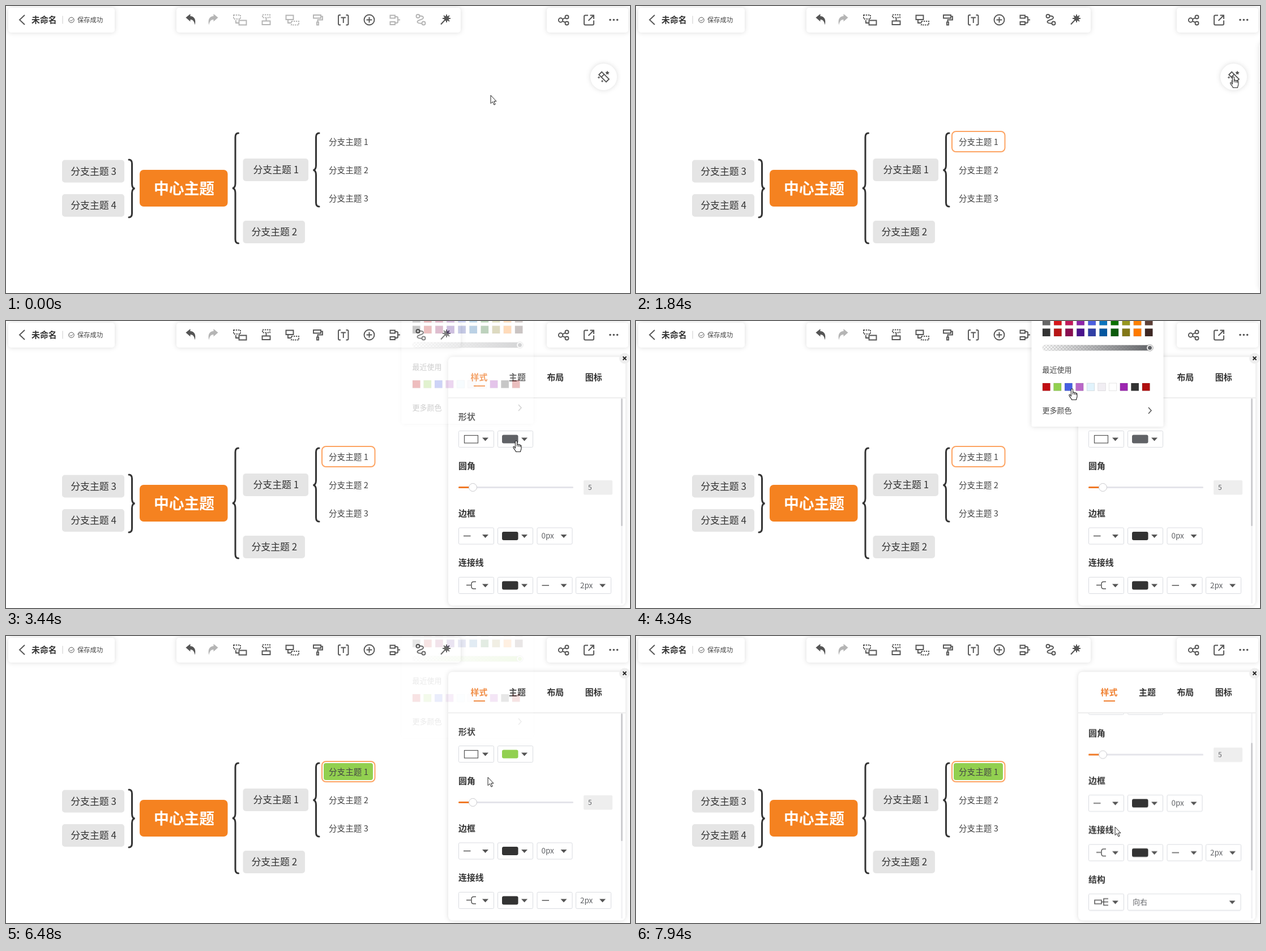
An HTML page that plays this animation: 1102x508 px, repeating every 8 s.

```html
<!DOCTYPE html>
<html lang="zh-CN">
<head>
<meta charset="utf-8">
<title>思维导图</title>
<style>
html, body { margin: 0; width: 100%; height: 100%; overflow: hidden; background: #fff; }
svg { display: block; width: 1102px; height: 508px; font-family: "Noto Sans CJK SC", "Noto Sans CJK", sans-serif; }
.card { fill: #fff; filter: drop-shadow(0 0 4px rgba(0, 0, 0, .14)); }
.icon { fill: none; stroke: currentColor; stroke-width: 1.9; color: #555; }
.thin { stroke-width: 1; }
.solid { fill: currentColor; stroke: none; }
.dash { stroke-dasharray: 2.4 1.6; }
.off { color: #b5b5b5; }
.brace { fill: none; stroke: #333; stroke-width: 3; stroke-linecap: round; }
.node { fill: #e5e5e5; }
.main { font-size: 16.9px; font-weight: 350; fill: #333; }
.sub { font-size: 14.6px; font-weight: 350; fill: #444; }
.head { font-size: 14.9px; font-weight: 700; fill: #333; }
.box { fill: #fff; stroke: #d9dbe0; }
.value { font-size: 13.5px; fill: #606266; }
.tri { fill: #555; }

.needs, .paint, .pick, .green, #arrow, #hand, #halo { animation: 8s step-end infinite; }
.needs { animation-name: enable; }
.paint { animation-name: paint; }
.pick { animation-name: pick; }
.green { animation-name: green; }
#arrow { animation-name: arrow; }
#hand { animation-name: hand; }
#halo { animation-name: halo; }
#cursor { animation: move 8s linear infinite; }
#panel { animation: slide 8s linear infinite; }
#popup { animation: popup 8s linear infinite; }
#content { animation: scroll 8s linear infinite; }
#thumb { animation: thumb 8s linear infinite; }

@keyframes enable { 0% { color: #b5b5b5 } 12%, 100% { color: #555 } }
@keyframes paint { 0% { color: #606266 } 60%, 100% { color: #92d050 } }
@keyframes pick { 0% { opacity: 0 } 12%, 100% { opacity: 1 } }
@keyframes green { 0% { opacity: 0 } 60%, 100% { opacity: 1 } }
@keyframes hand {
  0%, 23.1%, 47%, 65.4%, 91%, 100% { opacity: 0 }
  18.5%, 33.1%, 50.6%, 86% { opacity: 1 }
}
@keyframes arrow {
  0%, 23.1%, 47%, 65.4%, 91%, 100% { opacity: 1 }
  18.5%, 33.1%, 50.6%, 86% { opacity: 0 }
}
@keyframes halo {
  0%, 14.4%, 22.2%, 41.7%, 61.1%, 80.2%, 100% { opacity: 0 }
  12%, 20.5%, 40%, 59.4%, 78.6% { opacity: .7 }
}
@keyframes move {
  0%, 7.4% { transform: translate(856px, 158px) }
  11.8%, 14.4% { transform: translate(610px, 244px) }
  17% { transform: translate(933px, 158px) }
  18.9% { transform: translate(1050px, 127px) }
  20%, 23% { transform: translate(1055px, 125px) }
  27.375% { transform: translate(988px, 148px) }
  33.75% { transform: translate(906px, 207px) }
  37.9%, 45.4% { transform: translate(901px, 212px) }
  48.25%, 48.5% { transform: translate(861px, 167px) }
  51.75%, 54.1% { transform: translate(778px, 120px) }
  54.25%, 56.5% { transform: translate(770px, 120px) }
  58.5%, 63% { transform: translate(746px, 117px) }
  66.25% { transform: translate(834px, 139px) }
  70.625% { transform: translate(852px, 136px) }
  76.75%, 80.5% { transform: translate(846px, 241px) }
  87.125% { transform: translate(911px, 358px) }
  88.875% { transform: translate(912px, 371px) }
  90.5% { transform: translate(917px, 372px) }
  92.4%, 94.2% { transform: translate(897px, 368px) }
  99.25%, 100% { transform: translate(846px, 338px) }
}
@keyframes slide {
  0%, 22.8% { transform: translate(340px) }
  25% { transform: translate(130px) }
  27.375% { transform: translate(23px) }
  29%, 100% { transform: none }
}
@keyframes popup {
  0%, 42.1% { opacity: 0; transform: translateY(-8px) }
  43% { opacity: .27; transform: translateY(-5px) }
  45.5%, 78.8% { opacity: 1; transform: none }
  81.3%, 100% { opacity: 0; transform: translateY(-8px) }
}
@keyframes scroll { 0%, 94.2% { transform: none } 98.4%, 100% { transform: translateY(-84.5px) } }
@keyframes thumb { 0%, 94.2% { transform: none } 98.4%, 100% { transform: translateY(52px) } }
</style>
</head>
<body>
<svg viewBox="0 0 1102 508">
  <defs>
    <clipPath id="body"><rect x="781" y="137" width="313" height="365"/></clipPath>
    <pattern id="checks" width="6" height="6" patternUnits="userSpaceOnUse">
      <path d="M0 0h3v6h3v-3h-6z" fill="#ddd"/>
    </pattern>
    <linearGradient id="alpha">
      <stop class="paint" stop-color="currentColor" stop-opacity="0"/>
      <stop class="paint" offset="1" stop-color="currentColor"/>
    </linearGradient>
  </defs>

  <!-- mind map -->
  <g class="brace">
    <path d="M410.500 225q-5.500 0-5.500 7V314q0 8-5 8.500q5 .5 5 8.500V413q0 7 5.500 7"/>
    <path d="M553 225q-5.500 0-5.500 7V282q0 8-5 8.500q5 .5 5 8.500V348q0 7 5.500 7"/>
    <path d="M217 272q5.500 0 5.500 7V314.500q0 8 5 8.500q-5 .5-5 8.500V367q0 7-5.500 7"/>
  </g>
  <rect x="236" y="290" width="155.500" height="65" rx="7" fill="#f58220"/>
  <text x="314.500" y="332.800" font-size="26.800" font-weight="700" fill="#fff" text-anchor="middle">中心主题</text>
  <g id="map"></g>

  <!-- toolbars -->
  <rect class="card" x="4" y="3" width="188" height="44" rx="5"/>
  <rect class="card" x="301" y="3" width="502" height="44" rx="5"/>
  <rect class="card" x="955" y="3" width="144" height="44" rx="5"/>
  <path class="icon" d="M33 16l-9 8.500l9 8.500"/>
  <text class="head" x="45" y="29.500">未命名</text>
  <path d="M100 17.500v14" stroke="#ccc"/>
  <g class="icon thin"><circle cx="115.500" cy="24.800" r="4.700"/><path d="M113 24.800l2 2l3.300-3.500"/></g>
  <text x="126" y="28.800" font-size="11.300" font-weight="350" fill="#444">保存成功</text>

  <g class="icon">
    <path id="undo" class="solid" d="M317.500 20.500L325.500 14V18C333 18 336 25 333.500 33.500C332.500 27 330 24 325.500 24V27.500Z"/>
    <g class="icon off"><use href="#undo" transform="translate(692) scale(-1 1)"/></g>
    <g class="needs">
      <path class="dash" d="M402 16h12v7h-12z"/><path d="M406 25v5h5M411.500 25.500h13v8h-13z"/>
      <path class="dash" d="M453 15.500h13v5h-13z"/><path d="M459.500 21v5M452.500 26.500h14v6.500h-14z"/>
      <path d="M494.500 16.500h13v7.500h-13zM498 24v6h5"/><path class="dash" d="M504 27h13v6.500h-13z"/>
      <path d="M543 16h13v5.500h-13zM556 18.500h3v6h-8.500v3.500M549 28.500h3v5h-3z"/>
      <path d="M678.500 16.500h8.500v5h-8.500zM678.500 28h8.500v5h-8.500zM687 19h3q2 0 2 2v7q0 2-2 2h-3M692 24.500h4"/>
      <circle cx="727.500" cy="18" r="3"/><circle cx="737.500" cy="30.500" r="3"/>
      <path d="M730.500 17.500c8 0 8 4.500 3 6.300l-3.500 1.200c-6 2-4.500 6 4.500 5.700"/>
    </g>
    <path d="M591 16h-2q-2 0-2 2v13.500q0 2 2 2h2M600.500 16h2q2 0 2 2v13.500q0 2-2 2h-2M591.500 20.500h8.500M595.800 20.500v9.500"/>
    <circle cx="641.500" cy="24.500" r="9"/><path d="M636.500 24.500h10M641.500 19.500v10"/>
    <circle class="solid" cx="778" cy="22" r="4.500"/>
    <path d="M778 15v14M771 22h14M773 17l10 10M783 17l-10 10M774 26l-6 6.500"/>

    <circle cx="979.500" cy="25" r="3.700"/><circle cx="990.500" cy="19.500" r="3"/><circle cx="990.500" cy="30.500" r="3"/>
    <path d="M983 23.300l4.800-2.400M983 26.800l4.800 2.400"/>
    <path d="M1028 16.500h-5q-2 0-2 2v13q0 2 2 2h13q2 0 2-2v-6M1028.500 26l9-9M1031.500 16.500h6.500v6.500"/>
    <g class="solid"><circle cx="1067" cy="24.500" r="1.800"/><circle cx="1073.300" cy="24.500" r="1.800"/><circle cx="1079.600" cy="24.500" r="1.800"/></g>
  </g>

  <circle class="card" cx="1055.500" cy="125.500" r="23.500"/>
  <g class="icon">
    <path d="M-9-3.500h18v7h-18zM-3-3.500v7" transform="translate(1056 125.500) rotate(45)"/>
    <path class="solid" d="M1062 114.500l1.200 2.300l2.500.4l-1.800 1.800l.4 2.500l-2.300-1.200l-2.300 1.200l.4-2.500l-1.800-1.800l2.500-.4zM1047 124l.8 1.700l1.700.8l-1.700.8l-.8 1.700l-.8-1.700l-1.700-.8l1.700-.8zM1053 130.500l.8 1.700l1.700.8l-1.700.8l-.8 1.700l-.8-1.700l-1.700-.8l1.700-.8z"/>
  </g>

  <!-- style panel -->
  <g id="panel">
    <rect class="card" x="781" y="63.500" width="313" height="440" rx="8"/>
    <g clip-path="url(#body)">
      <g id="content"></g>
      <path d="M1087.500 137V500" stroke="#f3f3f5" stroke-width="3"/>
      <rect id="thumb" x="1086" y="137" width="3" height="226" rx="1.500" fill="#cdcdd0"/>
    </g>
    <path d="M781 136h313" stroke="#ddd" stroke-width="1.200"/>
    <g id="tabs"></g>
    <path d="M826 115h20" stroke="#f08030" stroke-width="2"/>
    <circle cx="1092.500" cy="66" r="9.500" fill="#eee"/>
    <path d="M1089.500 63l6 6M1095.500 63l-6 6" stroke="#222" stroke-width="1.800"/>
  </g>

  <!-- colour popup -->
  <g id="popup">
    <rect class="card" x="698.500" y="-20" width="233" height="207" rx="3"/>
    <g id="swatches"></g>
    <rect x="718" y="42.500" width="195" height="10" rx="5" fill="url(#checks)"/>
    <rect x="718" y="42.500" width="195" height="10" rx="5" fill="url(#alpha)" stroke="#ddd" stroke-width=".7"/>
    <circle class="paint" cx="907.500" cy="47.500" r="4.500" fill="currentColor" stroke="#fff" stroke-width="2"/>
    <circle cx="907.500" cy="47.500" r="5.600" fill="none" stroke="#888" stroke-width=".8"/>
    <g font-size="13" font-weight="350" fill="#444"><text x="717.500" y="90.500">最近使用</text><text x="717.500" y="163">更多颜色</text></g>
    <path d="M905 153l5 5.500l-5 5.500" fill="none" stroke="#555" stroke-width="1.500"/>
  </g>

  <g id="cursor">
    <circle id="halo" cy="-2" r="10" fill="#f3ec38"/>
    <path id="arrow" d="M0 0V14.500L3.400 11.500L5.900 17L8.100 16L5.700 10.700H10Z" fill="#fff" stroke="#222"/>
    <path id="hand" d="M-1.600 1.600a1.600 1.600 0 0 1 3.200 0V7a1.500 1.500 0 0 1 2.900.4a1.400 1.400 0 0 1 2.600.7a1.200 1.200 0 0 1 1.900 1V13.500c0 2.500-1.500 3.500-1.500 6H-.5c0-2-3-4-4.500-7.500c-.7-1.700 1-2.400 2-1l1.400 1.800ZM1.600 7v3M4.500 7.500v3M7.100 8.500v2.500" fill="#fff" stroke="#222" stroke-width="1.100"/>
  </g>
</svg>
<script>
const put = (id, parts) => { document.getElementById(id).innerHTML = parts.join(''); };
const text = (cls, x, y, s, extra = '') => `<text class="${cls}" x="${x}" y="${y}" ${extra}>${s}</text>`;
const rect = (x, y, w, h, extra) => `<rect x="${x}" y="${y}" width="${w}" height="${h}" ${extra}/>`;
const middle = 'text-anchor="middle"';

const branch = (x, y, w, n) => rect(x, y, w, 40, 'rx="5" class="node"') +
  text('main', x + w / 2 + .5, y + 26.2, '分支主题 ' + n, middle);
put('map', [
  branch(418.5, 270, 115.5, 1), branch(418.5, 380, 109.5, 2),
  branch(99, 272.5, 110, 3), branch(99, 333, 110, 4),
  rect(561, 225, 87, 30, 'rx="4" fill="#92d050" class="green"'),
  rect(558, 222, 93.5, 36, 'rx="7" fill="none" stroke="#fda463" stroke-width="2" class="pick"'),
  ...[1, 2, 3].map(n => text('sub', 570, 195.6 + 50 * n, '分支主题 ' + n))
]);

put('tabs', ['样式', '主题', '布局', '图标'].map((s, i) =>
  text('head', 835.5 + 67.4 * i, 105, s, middle + (i ? '' : ' style="fill:#f08030"'))));

// A dropdown box with whatever it shows inside.
const drop = (x, y, inner, w = 63) => rect(x + .5, y + .5, w - 1, 29, 'rx="2" class="box"') + inner +
  `<path class="tri" d="M${x + w - 21} ${y + 12.500}h11l-5.500 6z"/>`;
const title = (y, s) => text('head', 799, y + 5.500, s);
const chip = (x, y, extra) => rect(x + 8, y + 7.5, 28.5, 15, 'rx="3" ' + extra);
const line = (x, y) => `<path d="M${x + 9} ${y + 15}h12.500" stroke="#555" stroke-width="1.500"/>`;
const stroke = d => `<path d="${d}" fill="none" stroke="#555" stroke-width="1.500"/>`;
const dark = 'fill="#333"';
put('content', [
  title(169, '形状'),
  drop(799, 194, rect(809.5, 202.5, 24, 13.5, 'fill="#fff" stroke="#555" stroke-width="1.200"')),
  drop(868, 194, chip(868, 194, 'class="paint" fill="currentColor"')),
  title(256, '圆角'),
  rect(799, 293, 203, 3, 'rx="1.500" fill="#e4e4ea"'),
  rect(799, 293, 20, 3, 'rx="1.500" fill="#f07a28"'),
  '<circle cx="824.500" cy="294.500" r="7" fill="#fff" stroke="#c8c8cc"/>',
  rect(1020, 282, 51, 25.5, 'rx="2" fill="#eee"'),
  text('value', 1028, 299, '5', 'style="font-size:12px"'),
  title(340, '边框'),
  drop(799, 365.5, line(799, 365.5)), drop(868, 365.5, chip(868, 365.5, dark)),
  drop(937.5, 365.5, text('value', 945.5, 385.3, '0px')),
  title(427, '连接线'),
  drop(799, 453, stroke('M813 467.500h8M830 461.500h-4q-4 0-4 4v4.500q0 4 4 4h4')),
  drop(868, 453, chip(868, 453, dark)), drop(937.5, 453, line(937.5, 453)),
  drop(1006, 453, text('value', 1014, 472.8, '2px')),
  title(515.5, '结构'),
  drop(799, 540.5, stroke('M810 552h12v6.500h-12zM822 555.200h12M834 549.500h-8v11.500h8')),
  drop(868, 540.5, text('value', 877, 560.3, '向右', 'style="font-size:13px"'), 200.5)
]);

const row = (y, step, colors) => colors.split(' ').map((c, i) =>
  rect(718 + step * i, y, 13.5, 13.5, `fill="#${c}" stroke="#000" stroke-opacity=".15" stroke-width=".7"`));
put('swatches', [
  ...row(-6, 20.1, '666 d8161a c2185b 8e24aa 4b5fe0 0b74bd 0a7000 96961f ff8000 5d4037'),
  ...row(13.5, 20.1, '333 b71515 8a0e50 4a148c 303fa5 0557a0 0b5a0b 827717 ff7a00 3e2723'),
  ...row(110, 19.55, 'c00d12 92d050 465fe0 ba68c8 e1f3fc f1eef3 fff 9c27b0 333 b01010')
]);
</script>
</body>
</html>
```
